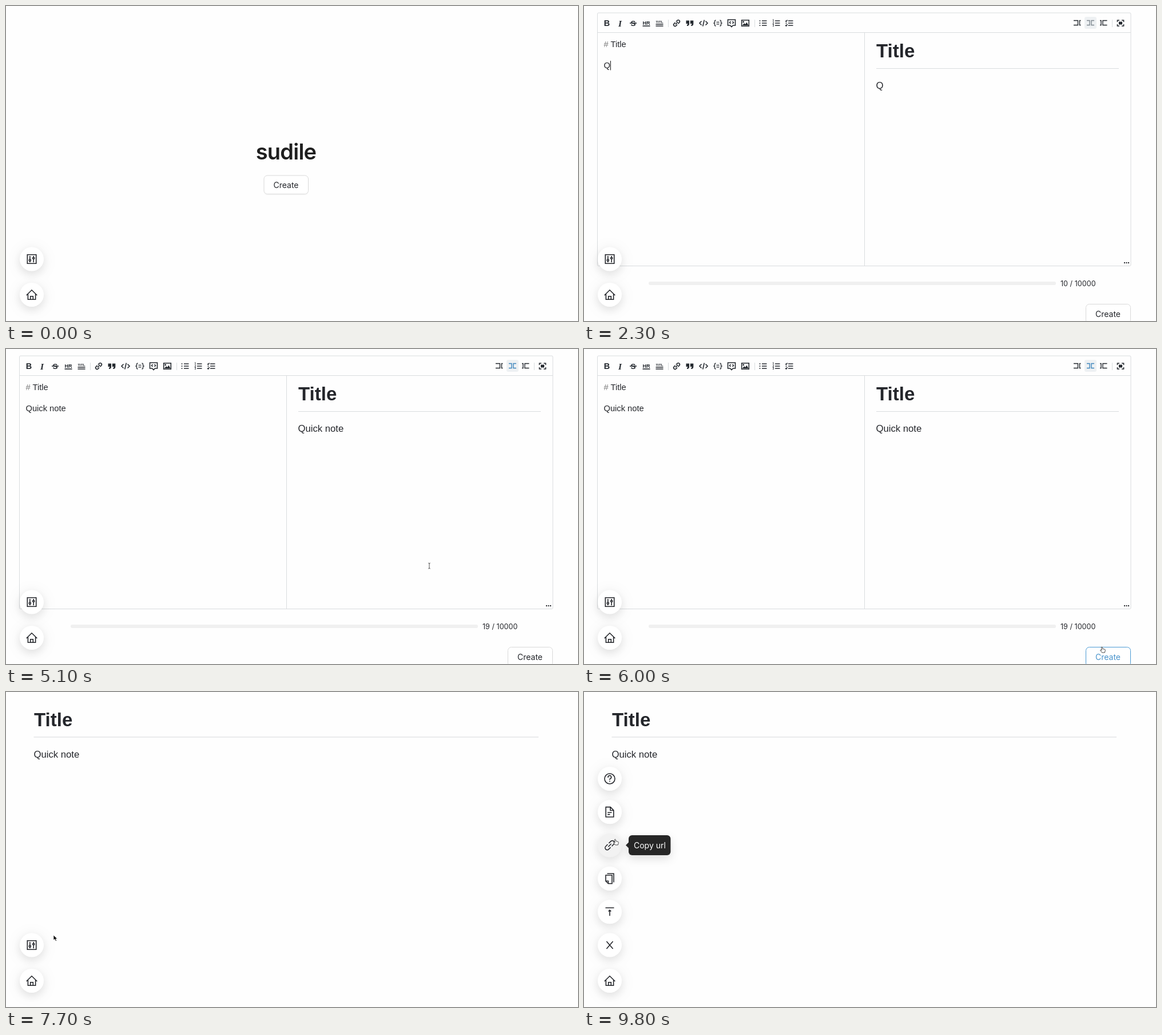
Write an HTML page that moves like this. It is 1000x552 px and loops after 9900 ms.

```html
<!DOCTYPE html>
<html lang="en">
<head>
<meta charset="utf-8">
<title>Quick notes</title>
<style>
  html, body { margin: 0; width: 100%; height: 100%; overflow: hidden; background: #fefefe; }
  svg { display: block; width: 1000px; height: 552px; }
  text { font-family: "Liberation Sans", Arial, sans-serif; fill: #24262b; white-space: pre; }
  .ui { font: 14px Inter, sans-serif; }
  .logo { font: 600 38px Inter, sans-serif; letter-spacing: -.8px; fill: #1f1f1f; }
  .code { font-size: 14.7px; }
  .body { font-size: 16.7px; }
  .h1 { font-size: 33px; font-weight: 700; }
  .mid { text-anchor: middle; }
  .line { fill: none; stroke: #d9dcde; }
  .ink { fill: none; stroke: #24262b; stroke-width: 1.6; }
  .tool { fill: none; stroke: #24292f; stroke-width: 1.6; }
  .tool text { stroke: none; fill: #24292f; font-weight: 700; }
  .solid { fill: #24292f; stroke: none; }
  .button { fill: #fff; stroke: #d9d9d9; filter: drop-shadow(0 2px 0 rgba(0,0,0,.02)); }
  .disc { filter: drop-shadow(0 6px 8px rgba(0,0,0,.08)) drop-shadow(0 3px 12px rgba(0,0,0,.07)); }
  .tip { filter: drop-shadow(0 6px 8px rgba(0,0,0,.12)); }
  .tip text { fill: #fff; }
</style>
</head>
<body>
<svg viewBox="0 0 1000 552">
  <g id="home">
    <text class="logo mid" x="489.5" y="268.5">sudile</text>
    <rect class="button" x="451" y="297" width="77.5" height="32.5" rx="6"/>
    <text class="ui mid" x="489.5" y="319">Create</text>
  </g>

  <g id="editor">
    <rect class="line" x="23.5" y="12" width="932.5" height="443.5" rx="2"/>
    <path class="line" d="M24 46.5H956M490.5 47V455M511 109.5H935M147.5 24V37M298.5 24V37M923.5 24V37"/>
    <g id="toolbar"></g>
    <rect x="875" y="19" width="21" height="21" rx="3" fill="#eef1f3"/>
    <path id="split" fill="none" stroke-width="1.4" d="M879 25.5H884V33.5H879M892 25.5H887V33.5H892"/>
    <text class="code" x="34.5" y="72"><tspan fill="#777">#</tspan> Title</text>
    <text class="code" id="typed" x="34.5" y="109.3"></text>
    <path id="caret" stroke="#111"/>
    <text class="h1" x="511" y="90">Title</text>
    <text class="body" id="preview" x="510.5" y="145"></text>
    <path stroke="#24262b" stroke-width="2" stroke-dasharray="2 1.5" d="M944 450H954"/>
    <rect x="113" y="483" width="712" height="6" rx="3" fill="#f0f0f0"/>
    <text class="ui" id="count" x="833" y="490.5" style="font-size:12.6px"></text>
    <rect class="button" id="createBox" x="877.5" y="522.5" width="78" height="34" rx="6"/>
    <text class="ui mid" id="createText" x="916" y="544.5">Create</text>
  </g>

  <g id="view">
    <text class="h1" x="49" y="60">Title</text>
    <path stroke="#e3e5e6" stroke-width="1.5" d="M48.5 79H931"/>
    <text class="body" x="48.5" y="114.7">Quick note</text>
  </g>

  <g id="menu"></g>
  <g id="dock"></g>
  <g id="tips"></g>

  <g id="cursor">
    <path id="arrow" fill="#111" stroke="#fff" stroke-width=".7" d="M-3-5V4L-1 2L1 5.5L2.5 4.8L1 1.7H4Z"/>
    <path id="beam" fill="none" stroke="#444" stroke-width=".9" d="M-1.8-5Q0-5 0-3.6Q0-5 1.8-5M0-4V4M-1.8 5Q0 5 0 3.6Q0 5 1.8 5"/>
    <path id="hand" fill="#fff" stroke="#333" stroke-width=".9" d="M-2.5-4.5Q-1.6-5.5-.8-4.5L0-1.5L3.5-.8Q4.8 0 4 2.5L3.3 5H-1.3L-4.3 1.3Q-4.5 0-3 .3L-1.8 1Z"/>
  </g>
</svg>

<script>
const $ = id => document.getElementById(id);
const clamp = v => Math.max(0, Math.min(1, v));
const show = (id, opacity) => $(id).setAttribute('opacity', opacity);
const LOOP = 9900;

// Toolbar glyphs, each drawn around its own centre
const label = (s, size, extra = '') => `<text class="mid" y="${size * .36}" font-size="${size}" ${extra}>${s}</text>`;
const path = (d, extra = '') => `<path d="${d}" ${extra}/>`;
const serif = 'style="font-family:Liberation Serif,serif"';
const rows = 'M-2-4H6.5M-2 0H6.5M-2 4H6.5';
const tools = [
  [40, label('B', 14.5)],
  [63, label('I', 15.5, serif + ' font-style="italic"')],
  [86, label('S', 13.5) + path('M-6 0H6')],
  [109, label('HR', 9) + path('M-6.5 5H6.5')],
  [132, label('TITL', 6.2, 'dy="-2"') + path('M-6.5 2H6.5M-6.5 5H6.5')],
  [162, `<g transform="rotate(-45)">${path('M-1-2.5H-4A2.5 2.5 0 0 0-4 2.5H-1M1-2.5H4A2.5 2.5 0 0 1 4 2.5H1M-3 0H3')}</g>`],
  [185, path('M-6.5-4.5H-1V1Q-1 5-5 5V3Q-3.5 2.5-3.5 1H-6.5ZM.8-4.5H6.3V1Q6.3 5 2.3 5V3Q3.8 2.5 3.8 1H.8Z', 'class="solid"')],
  [209, path('M-3.5-3.5L-7 0L-3.5 3.5M3.5-3.5L7 0L3.5 3.5M1.3-5.5L-1.3 5.5')],
  [234, path('M-3.5-5Q-5.5-5-5.5-3V-1L-7 0L-5.5 1V3Q-5.5 5-3.5 5M3.5-5Q5.5-5 5.5-3V-1L7 0L5.5 1V3Q5.5 5 3.5 5M-2.5-1.6H2.5M-2.5 1.6H2.5', 'stroke-width="1.3"')],
  [258, path('M-6.5-6H6.5V4H2.5L0 6.5L-2.5 4H-6.5ZM-1.5-3L-3.5-1L-1.5 1M1.5-3L3.5-1L1.5 1')],
  [282, path('M-6.3-5.3H6.3V5.3H-6.3Z') + path('M-5 4L-2 0L0 2L2.5-1.5L5.5 4ZM-4.5-3.5H-2V-1H-4.5Z', 'class="solid"')],
  [313, path(rows + 'M-6.5-4H-4.5M-6.5 0H-4.5M-6.5 4H-4.5')],
  [336, path(rows) + ['1', '2', '3'].map((n, i) => `<text x="-6.5" y="${i * 4.3 - 2.6}" font-size="5">${n}</text>`).join('')],
  [359, path(rows + 'M-7-4L-5.5-2.8L-3.5-5.5M-7 3.5L-5.5 5L-3.5 2M-6.5 0H-4.5')],
  [862, path('M-6-4.5H1.5V3.5H-6M6.5-4.5H4.5V3.5H6.5', 'stroke-width="1.4"')],
  [908, path('M-6-4.5H-4V3.5H-6M6.5-4.5H-1V3.5H6.5', 'stroke-width="1.4"')],
  [938, path('M-5.5-2V-5H-2M2-5H5.5V-2M5.5 2V5H2M-2 5H-5.5V2') + path('M-3-2.5H3V2.5H-3Z', 'class="solid"')],
];
$('toolbar').innerHTML = tools.map(([x, art]) => `<g class="tool" transform="translate(${x} 30)">${art}</g>`).join('');

// Round floating buttons
const icons = {
  help: 'M9 0A9 9 0 1 1-9 0A9 9 0 1 1 9 0M-2.8-2A2.8 2.8 0 1 1 1-.2Q0 .3 0 2M0 3.6V5.3',
  file: 'M-6.8-8.7H1.2L6.8-3V8.7H-6.8ZM1-8.5V-2.8H6.6M-3.8 1H3.5M-3.8 4.3H.5',
  link: 'M-1.6-3.6L1.9-7A3.6 3.6 0 0 1 7-1.9L3.6 1.6M1.6 3.6L-1.9 7A3.6 3.6 0 0 1-7 1.9L-3.6-1.6M-2.6 2.6L2.6-2.6',
  copy: 'M-4.5-8.8H7V6.5M-7-6H4V8.8H-2.5L-7 4.5ZM-7 4.3H-2.5V8.6',
  top: 'M-7.5-7H7.5M0-3V7M-2.3-.8L0-3.2L2.3-.8',
  close: 'M-5.6-6.5L5.6 6.5M5.6-6.5L-5.6 6.5',
  sliders: 'M-7.7-7.7H7.7V7.7H-7.7ZM-3.2-5.5V.2M-3.2 3.8V5.7M3.2-5.5V-3.5M3.2 .2V5.7M-4.7 2A1.5 1.5 0 1 0-1.7 2A1.5 1.5 0 1 0-4.7 2M1.7-1.6A1.5 1.5 0 1 0 4.7-1.6A1.5 1.5 0 1 0 1.7-1.6',
  home: 'M-9.3 1L0-8.2L9.3 1M-6.6-1V8.2H6.6V-1M-2.3 8V2.8H2.3V8',
};
const button = (name, y) => `<g transform="translate(45 ${y})">
  <g class="disc"><circle id="${name}Disc" r="21" fill="#fff"/></g>
  <path class="ink" id="${name}" d="${icons[name]}"/></g>`;
const spots = { help: 152, file: 210.3, link: 268.6, copy: 327, top: 385.3, sliders: 443.5, home: 506 };
const names = Object.keys(spots);
const draw = list => list.map(n => button(n, spots[n])).join('');
$('menu').innerHTML = draw(names.slice(0, 5));
$('dock').innerHTML = draw(names.slice(5)) +
  `<path class="ink" id="close" transform="translate(45 443.5)" d="${icons.close}"/>`;

function addTip(id, words, y) {
  $('tips').insertAdjacentHTML('beforeend', `<g class="tip" id="${id}" transform="translate(78 ${y})">
    <rect y="-17.5" height="35" rx="6" fill="#262626"/><path d="M1-6L-5 0L1 6Z" fill="#262626"/>
    <text class="ui" x="9" y="5.3">${words}</text></g>`);
  const tip = $(id);
  tip.querySelector('rect').setAttribute('width', tip.querySelector('text').getComputedTextLength() + 17.5);
}
addTip('copyTip', 'Copy markdown', spots.copy);
addTip('linkTip', 'Copy url', spots.link);

// Pointer route: time, x, y, shape until the next stop
const route = [
  [0, 0, 0, ''], [100, 640, 420, 'arrow'], [300, 490, 312, 'hand'], [600, 486, 309, 'beam'],
  [900, 486, 309, 'beam'], [1400, 80, 68, 'beam'], [1600, 80, 68, ''],
  [4500, 80, 68, 'beam'], [5000, 640, 330, 'beam'], [5300, 940, 480, 'arrow'], [5500, 912, 531, 'hand'],
  [6000, 907, 527, 'hand'], [6900, 907, 527, 'arrow'], [7400, 335, 425, 'arrow'], [7600, 335, 425, 'arrow'],
  [7700, 86, 431, 'arrow'], [8000, 50, 441, 'hand'], [8600, 50, 441, 'hand'], [9000, 46, 318, 'hand'],
  [9300, 46, 318, 'hand'], [9600, 56, 263, 'hand'], [LOOP, 56, 263, 'hand'],
];
function pointerAt(t) {
  const i = route.findIndex(stop => stop[0] > t) - 1;
  const [t0, x0, y0, shape] = route[i], [t1, x1, y1] = route[i + 1];
  const k = (t - t0) / (t1 - t0);
  return { x: x0 + (x1 - x0) * k, y: y0 + (y1 - y0) * k, shape };
}

const note = 'Quick note';
const keyTimes = [2000, 2800, 2900, 3000, 3100, 3300, 3700, 4100, 4200, 4200];
// The preview waits for a pause in typing: time, letters shown
const previews = [[2300, 1], [3600, 6], [3900, 7], [4500, 10]];

function render(t) {
  const pointer = pointerAt(t);
  const hand = pointer.shape === 'hand';

  show('home', t < 600 ? 1 : 0);
  show('editor', t < 600 ? 0 : t < 700 ? .2 : t < 900 ? .6 : clamp((6900 - t) / 200));
  show('view', clamp((t - 6700) / 200));

  const typed = keyTimes.filter(k => k <= t).length;
  $('typed').textContent = note.slice(0, typed);
  $('preview').textContent = note.slice(0, previews.reduce((n, [at, len]) => t >= at ? len : n, 0));
  $('count').textContent = `${7 + (t >= 1700 ? 2 : 0) + typed} / 10000`;

  const newLine = t >= 1700;
  const caretX = newLine ? 34.5 + (typed ? $('typed').getComputedTextLength() : 0) : 74.5;
  $('caret').setAttribute('d', `M${caretX + .5} ${newLine ? 96 : 59}v16.5`);
  show('caret', t >= 1500 && t < 4700 ? 1 : 0);

  const overCreate = hand && pointer.y > 515 && pointer.x > 870;
  $('createBox').style.stroke = overCreate ? '#4a9ad4' : '#d9d9d9';
  $('createText').style.fill = overCreate ? '#4a94cc' : '#24262b';
  $('split').setAttribute('stroke', t < 4500 ? '#7f8990' : '#3f86bd');

  const open = clamp((t - 8100) / 300);
  show('menu', open);
  $('menu').setAttribute('transform', `translate(0 ${42 * (1 - open) ** 2})`);
  show('sliders', t < 8200 ? 1 : 0);
  show('close', t < 8200 ? 0 : 1);
  for (const name of names) {
    const over = hand && pointer.x < 66 && Math.abs(pointer.y - spots[name]) < 21;
    $(name + 'Disc').setAttribute('fill', over ? '#f2f2f2' : '#fff');
  }
  show('copyTip', clamp((t - 9000) / 200) * clamp((9600 - t) / 200));
  show('linkTip', clamp((t - 9500) / 200));

  for (const shape of ['arrow', 'beam', 'hand']) show(shape, pointer.shape === shape ? 1 : 0);
  $('cursor').setAttribute('transform', `translate(${pointer.x} ${pointer.y})`);
}

const start = performance.now();
function tick() {
  // Ten pictures per second, like a screen recording
  render(Math.floor((performance.now() - start) % LOOP / 100) * 100);
  requestAnimationFrame(tick);
}
tick();
</script>
</body>
</html>
```
